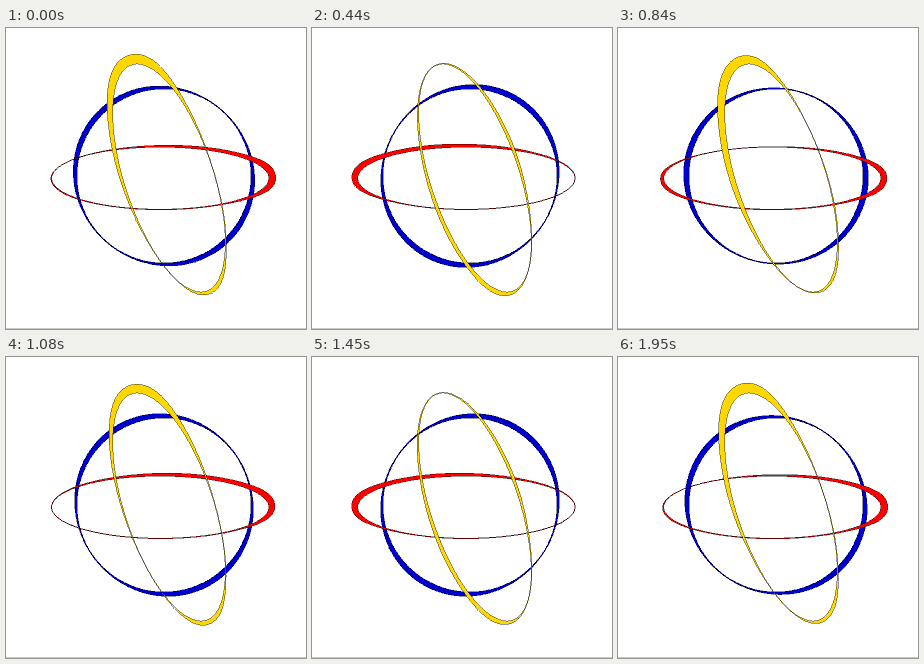
Write an HTML page that moves like this. It is 300 px wide and 301 px high and loops after 1970 ms.

```html
<!DOCTYPE html>
<html lang="en">
<head>
<meta charset="utf-8">
<title>Three rings</title>
<style>
  html, body { margin: 0; width: 100%; height: 100%; overflow: hidden; background: #fff; }
  svg { display: block; width: 100vw; height: 100vh; }
  path { fill-rule: evenodd; stroke: #000; stroke-width: .4; }
</style>
</head>
<body>
<svg viewBox="0 0 300 301" shape-rendering="crispEdges">
  <rect y="300" width="300" height="1" fill="#c8c8c8"/>
</svg>
<script>
const LOOP = 1970, PULSE = LOOP / 2, TAU = 2 * Math.PI, STEPS = 240;
const { sin, cos, hypot } = Math;
const svg = document.querySelector('svg');

// Each ring is a fixed inner ellipse with a band that swells outwards.
//   turn:  direction of the first axis, radians counterclockwise from the right
//   thin:  least width of the band;  swell(u): how much it grows at angle u
//   peak(u): time in ms at which the band is widest at angle u
const rings = [
  {
    fill: 'mediumblue', cx: 158, cy: 148, a: 87, b: 87, turn: 0, thin: .9,
    swell: () => 4.7,
    peak: u => 766 - 2 * PULSE * u / TAU
  },
  {
    fill: 'red', cx: 154.3, cy: 150.2, a: 108.5, b: 31, turn: 0, thin: .4,
    swell: u => 2 + 1.6 * sin(u) + 4.7 * cos(u) ** 6,
    peak: u => 28 + PULSE * u / TAU - 54 * cos(u)
  },
  {
    fill: 'gold', cx: 163, cy: 150, a: 119.2, b: 44.3, turn: 1.89, thin: .4,
    swell: u => 4.7 + 3 * cos(u - .57) + 1.7 * cos(2 * u) + .8 * cos(4 * u),
    peak: u => 80 - 2 * PULSE * u / TAU - 170 * cos(u + .82)
  }
];

function ringPath({ cx, cy, a, b, turn, thin, swell, peak }, ms) {
  const ct = cos(turn), st = sin(turn);
  const place = (x, y) =>
    (cx + x * ct - y * st).toFixed(2) + ' ' + (cy - x * st - y * ct).toFixed(2);
  const inner = [], outer = [];
  for (let i = 0; i < STEPS; i++) {
    const u = i / STEPS * TAU, c = cos(u), s = sin(u);
    const pulse = (1 + cos((ms - peak(u)) / PULSE * TAU)) / 2;
    const grow = (thin + swell(u) * pulse) / hypot(b * c, a * s);
    inner.push(place(a * c, b * s));
    outer.push(place(a * c + b * c * grow, b * s + a * s * grow));
  }
  return `M${outer.join('L')}ZM${inner.join('L')}Z`;
}

for (const ring of rings) {
  ring.path = document.createElementNS('http://www.w3.org/2000/svg', 'path');
  ring.path.setAttribute('fill', ring.fill);
  svg.append(ring.path);
}

const start = performance.now();
function draw(now) {
  const ms = Math.max(0, now - start) % LOOP;
  const held = Math.floor(ms / 20) * 20;
  for (const ring of rings) ring.path.setAttribute('d', ringPath(ring, held));
  requestAnimationFrame(draw);
}
draw(start);
</script>
</body>
</html>
```
